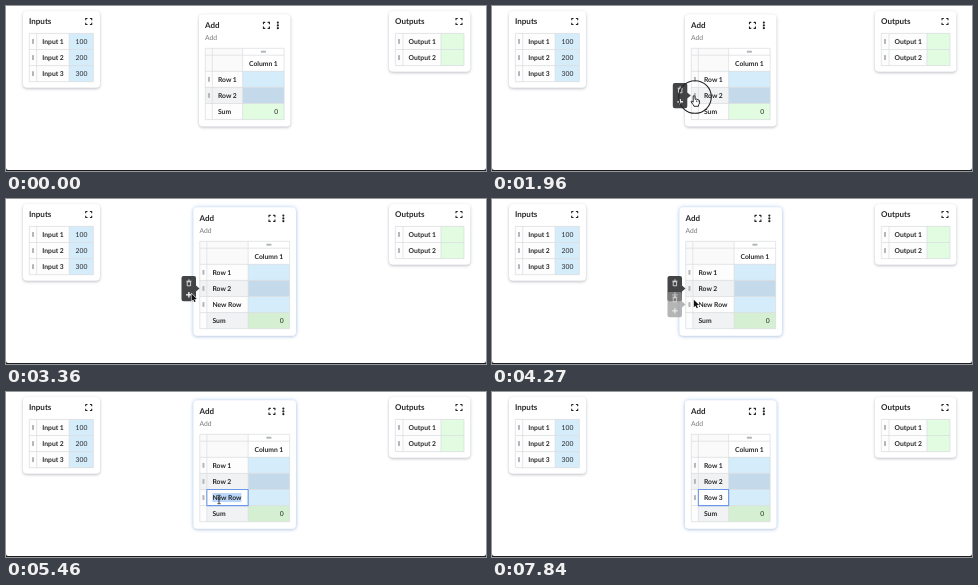
An HTML page with a canvas that plays this animation: 480 by 165 pixels, repeating every 8 s.

```html
<!DOCTYPE html>
<html lang="en">
<head>
<meta charset="utf-8">
<title>Adding a table row</title>
<style>
  html, body { margin: 0; width: 100%; height: 100%; overflow: hidden; background: #fff; }
  canvas { display: block; width: 480px; height: 165px; }
</style>
</head>
<body>
<canvas id="stage"></canvas>
<script>
const W = 480, H = 165, LOOP = 8000, STEP = 70;
const canvas = document.getElementById('stage');
const ctx = canvas.getContext('2d');
const dpr = window.devicePixelRatio || 1;
canvas.width = W * dpr;
canvas.height = H * dpr;
ctx.textRendering = 'geometricPrecision';

const INK = '#262626', LINE = '#d9dbde';
const BLUE = ['#d5ecfb', '#c4d9ea'];
const GREEN = ['#e2fce1', '#d4efd2'];
const LABEL = ['#fdfdfd', '#f1f2f3'];
const ROW = 16.1, SIDE_TOP = 27.4, ADD_TOP = 65.3;

const ADDED = 3360, FOCUS = 4760, SELECT_WORD = 5040, SELECT_ALL = 5250;
const TYPING = 6370, CARET_OFF = 7840;
const typed = [[6370, 'R'], [6790, 'Ro'], [7000, 'Row'], [7210, 'Row '], [7280, 'Row 3']];
const rings = [[1960, 2030, 203, 91, 16.3], [2030, 2170, 203, 91, 13],
               [3220, 3360, 185.5, 94.5, 13], [5040, 5180, 213, 107.5, 10]];
const path = [[1050, 263, 8], [1890, 202, 89.5], [2450, 202, 89.5], [3080, 185.5, 94.6],
              [3920, 185.5, 94.6], [4270, 201.8, 100.8], [4410, 206, 103.5],
              [4480, 206, 103.5], [4760, 213, 107.5]];

const ramp = (t, a, b) => Math.min(1, Math.max(0, (t - a) / (b - a)));
const smooth = p => p * p * (3 - 2 * p);

function rect(x, y, w, h, fill) {
  ctx.fillStyle = fill;
  ctx.fillRect(x, y, w, h);
}

function line(x1, y1, x2, y2, color = LINE, width = 0.7) {
  ctx.strokeStyle = color;
  ctx.lineWidth = width;
  ctx.beginPath();
  ctx.moveTo(x1, y1);
  ctx.lineTo(x2, y2);
  ctx.stroke();
}

function setFont(size, weight) {
  ctx.font = `${weight} ${size}px Lato, sans-serif`;
}

function text(str, x, y, { size = 6.75, weight = 700, color = INK, align = 'left' } = {}) {
  setFont(size, weight);
  ctx.fillStyle = color;
  ctx.textAlign = align;
  ctx.fillText(str, x, y + size * 0.36);
}

function box(x, y, w, h, r) {
  ctx.beginPath();
  ctx.roundRect(x, y, w, h, r);
}

// A selected card trades its grey shadow for a blue glow
function card(x, y, w, h, glow = 0) {
  ctx.save();
  ctx.fillStyle = '#fff';
  ctx.shadowColor = `rgba(40,50,70,${0.32 - 0.14 * glow})`;
  ctx.shadowBlur = 3 * dpr;
  ctx.shadowOffsetY = dpr;
  box(x, y, w, h, 4);
  ctx.fill();
  if (glow) {
    ctx.shadowColor = `rgba(90,155,245,${0.42 * glow})`;
    ctx.shadowBlur = 4 * dpr;
    ctx.shadowOffsetY = 0;
    ctx.fill();
  }
  ctx.restore();
}

function expandIcon(x, y) {
  ctx.strokeStyle = INK;
  ctx.lineWidth = 1.1;
  ctx.beginPath();
  for (const sx of [-1, 1]) for (const sy of [-1, 1]) {
    ctx.moveTo(x + sx * 1.2, y + sy * 3);
    ctx.lineTo(x + sx * 3, y + sy * 3);
    ctx.lineTo(x + sx * 3, y + sy * 1.2);
  }
  ctx.stroke();
}

function grip(x, y, flat) {
  const [w, h] = flat ? [5, 2] : [2, 4.8];
  rect(x - w / 2, y - h / 2, w, h, '#b4b6b9');
}

// cols: left edges of grip, label and value columns, then the right edge
function tableRow(cols, y, row, shade = 0) {
  const [x0, x1, x2, x3] = cols;
  const mid = y + ROW / 2;
  rect(x0, y, x1 - x0, ROW, LABEL[row.fixed ? 0 : shade]);
  rect(x1, y, x2 - x1, ROW, LABEL[shade]);
  rect(x2, y, x3 - x2, ROW, row.fill);
  if (!row.fixed) grip(x0 + 3.7, mid, false);
  text(row.label, x1 + 5.6, mid);
  if (row.value) text(row.value, x3 - 6, mid, { weight: 400, align: 'right' });
}

function grid(cols, top, bottom, count) {
  for (const x of cols) line(x, top, x, bottom);
  for (let i = 0; i <= count; i++) line(cols[0], bottom - i * ROW, cols[3], bottom - i * ROW);
}

function sideCard(x, w, title, cols, rows) {
  card(x, 5, w, 28.5 + rows.length * ROW);
  text(title, x + 6, 15.5, { size: 8 });
  expandIcon(x + w - 11.3, 15.5);
  rows.forEach((row, i) => tableRow(cols, SIDE_TOP + i * ROW, row));
  grid(cols, SIDE_TOP, SIDE_TOP + rows.length * ROW, rows.length);
}

function rowName(t) {
  let name = 'New Row';
  for (const [at, str] of typed) if (t >= at) name = str;
  return name;
}

function addCard(t) {
  const wide = t >= ADDED && t < TYPING;
  const w = wide ? 102.5 : 91.5;
  const x = 238.7 - w / 2, right = x + w;
  const cols = [x + 6.3, x + 13.4, right - 47.8, right - 6.3];
  const rows = [{ label: 'Row 1', fill: BLUE[0] }, { label: 'Row 2', fill: BLUE[1] }];
  if (t >= ADDED) rows.push({ label: '', fill: BLUE[0] });
  rows.push({ label: 'Sum', fill: GREEN[rows.length % 2], value: '0', fixed: true });

  const bottom = ADD_TOP + rows.length * ROW;
  card(x, 8.3, w, bottom + 7 - 8.3, ramp(t, 2100, 2240));
  text('Add', x + 6, 19.3, { size: 8 });
  text('Add', x + 6, 31.5, { weight: 400, color: '#777' });
  expandIcon(right - 24, 19.4);
  ctx.fillStyle = INK;
  for (let i = -1; i <= 1; i++) {
    ctx.beginPath();
    ctx.arc(right - 12.6, 19.4 + i * 2.8, 1.1, 0, 7);
    ctx.fill();
  }

  rect(cols[0], 42.3, cols[2] - cols[0], 23, '#fafafa');
  const mid = (cols[2] + cols[3]) / 2;
  grip(mid, 45.7, true);
  text('Column 1', mid, 57.3, { align: 'center' });
  rows.forEach((row, i) => tableRow(cols, ADD_TOP + i * ROW, row, i % 2));
  line(cols[0], 42.3, cols[3], 42.3);
  grid(cols, 42.3, bottom, rows.length + 1);
  if (t >= ADDED) newRowLabel(t, cols);
}

function newRowLabel(t, cols) {
  const y = ADD_TOP + 2 * ROW, mid = y + ROW / 2;
  const x = cols[1] + 5.6, name = rowName(t);
  setFont(6.75, 700);
  const width = ctx.measureText(name).width;
  if (t >= FOCUS) {
    rect(cols[1], y, cols[2] - cols[1], ROW, '#fff');
    ctx.strokeStyle = '#6a98e6';
    ctx.lineWidth = 1.1;
    ctx.strokeRect(cols[1], y, cols[2] - cols[1], ROW);
  }
  if (t >= SELECT_WORD && t < TYPING) {
    const marked = t < SELECT_ALL ? ctx.measureText('New').width : width;
    rect(x, mid - 4.5, marked, 9, '#b9d6fa');
  }
  text(name, x, mid);
  if (t >= TYPING && t < CARET_OFF) rect(x + width, mid - 4.2, 0.8, 8.4, '#222');
}

function rowMenu(x, y, color, alpha) {
  if (alpha <= 0) return;
  const icon = '#f4f4f4', cx = x + 7.4;
  ctx.save();
  ctx.globalAlpha = alpha;
  ctx.fillStyle = color;
  box(x, y - 12.6, 14.5, 25.2, 2);
  ctx.moveTo(x + 14.5, y - 3);
  ctx.lineTo(x + 18, y);
  ctx.lineTo(x + 14.5, y + 3);
  ctx.fill();
  ctx.strokeStyle = icon;
  ctx.lineWidth = 0.8;
  ctx.strokeRect(cx - 1.7, y - 6.8, 3.4, 4);
  line(cx - 2.6, y - 7.4, cx + 2.6, y - 7.4, icon, 0.8);
  line(cx - 0.9, y - 8.5, cx + 0.9, y - 8.5, icon, 0.8);
  line(cx - 2.8, y + 6.2, cx + 2.8, y + 6.2, icon, 1.4);
  line(cx, y + 3.4, cx, y + 9, icon, 1.4);
  ctx.restore();
}

function menus(t) {
  const out = 1 - ramp(t, 4480, 4760);
  const x = t < ADDED ? 180.8 : 175.5;
  rowMenu(x, 89.6, '#434446', Math.min(ramp(t, 1610, 1820), out));
  rowMenu(x, 105.6, '#969696', 0.7 * Math.min(ramp(t, 3990, 4270), out));
}

function polygon(x, y, points) {
  ctx.beginPath();
  points.forEach(([dx, dy]) => ctx.lineTo(x + dx, y + dy));
  ctx.closePath();
}

function arrow(x, y) {
  polygon(x, y, [[0, 0], [0, 7.4], [1.7, 5.9], [2.9, 8.5], [4.1, 8], [2.9, 5.4], [5.3, 5.3]]);
  ctx.lineJoin = 'round';
  ctx.lineWidth = 1.1;
  ctx.strokeStyle = '#fff';
  ctx.stroke();
  ctx.fillStyle = '#111';
  ctx.fill();
}

function hand(x, y) {
  polygon(x, y, [[-0.8, 0.5], [0, 0], [0.9, 0.6], [1.1, 3.8], [2.6, 3.6], [4, 4.2], [5.4, 4.9],
    [5.6, 7.4], [4.6, 9.4], [4.4, 10.8], [0, 10.8], [-0.9, 9], [-3, 6.4], [-2.5, 5.6], [-0.8, 6.7]]);
  ctx.fillStyle = '#fff';
  ctx.fill();
  ctx.lineJoin = 'round';
  ctx.lineWidth = 0.9;
  ctx.strokeStyle = '#1a1a1a';
  ctx.stroke();
  line(2.5 + x, 4.8 + y, 2.5 + x, 6.6 + y, '#1a1a1a', 0.6);
  line(4 + x, 5.1 + y, 4 + x, 6.8 + y, '#1a1a1a', 0.6);
}

function beam(x, y) {
  line(x, y - 4, x, y + 4, INK, 0.9);
  line(x - 1.7, y - 4.2, x + 1.7, y - 4.2, INK, 0.8);
  line(x - 1.7, y + 4.2, x + 1.7, y + 4.2, INK, 0.8);
}

function cursor(t) {
  if (t < 1120 || t >= TYPING) return;
  let [, x, y] = path[0];
  for (let i = 1; i < path.length; i++) {
    const [t0, x0, y0] = path[i - 1], [t1, x1, y1] = path[i];
    if (t < t0) break;
    const p = smooth(ramp(t, t0, t1));
    x = x0 + (x1 - x0) * p;
    y = y0 + (y1 - y0) * p;
  }
  if (t >= 4620) beam(x, y);
  else if (t >= 1820 && t < 2660) hand(x, y);
  else arrow(x, y);
}

function ring(t) {
  for (const [from, to, x, y, r] of rings) {
    if (t < from || t >= to) continue;
    ctx.strokeStyle = '#222';
    ctx.lineWidth = 1.1;
    ctx.beginPath();
    ctx.arc(x, y, r, 0, 7);
    ctx.stroke();
  }
}

function draw(t) {
  ctx.setTransform(dpr, 0, 0, dpr, 0, 0);
  rect(0, 0, W, H, '#fff');
  rect(0, 160, W, 5, '#1c1c1c');
  ctx.fillStyle = '#fff';
  box(0, 150, W, 14, [0, 0, 2, 2]);
  ctx.fill();

  sideCard(17, 77, 'Inputs', [23.3, 30.7, 63.2, 87.3], [1, 2, 3].map(n =>
    ({ label: 'Input ' + n, fill: BLUE[0], value: String(n * 100) })));
  sideCard(383, 81.3, 'Outputs', [389.3, 397, 435, 458], [1, 2].map(n =>
    ({ label: 'Output ' + n, fill: GREEN[0] })));
  addCard(t);
  menus(t);
  cursor(t);
  ring(t);
}

const start = performance.now();
function tick() {
  const t = (performance.now() - start) % LOOP;
  draw(Math.floor(t / STEP) * STEP);
  requestAnimationFrame(tick);
}
tick();
</script>
</body>
</html>
```
